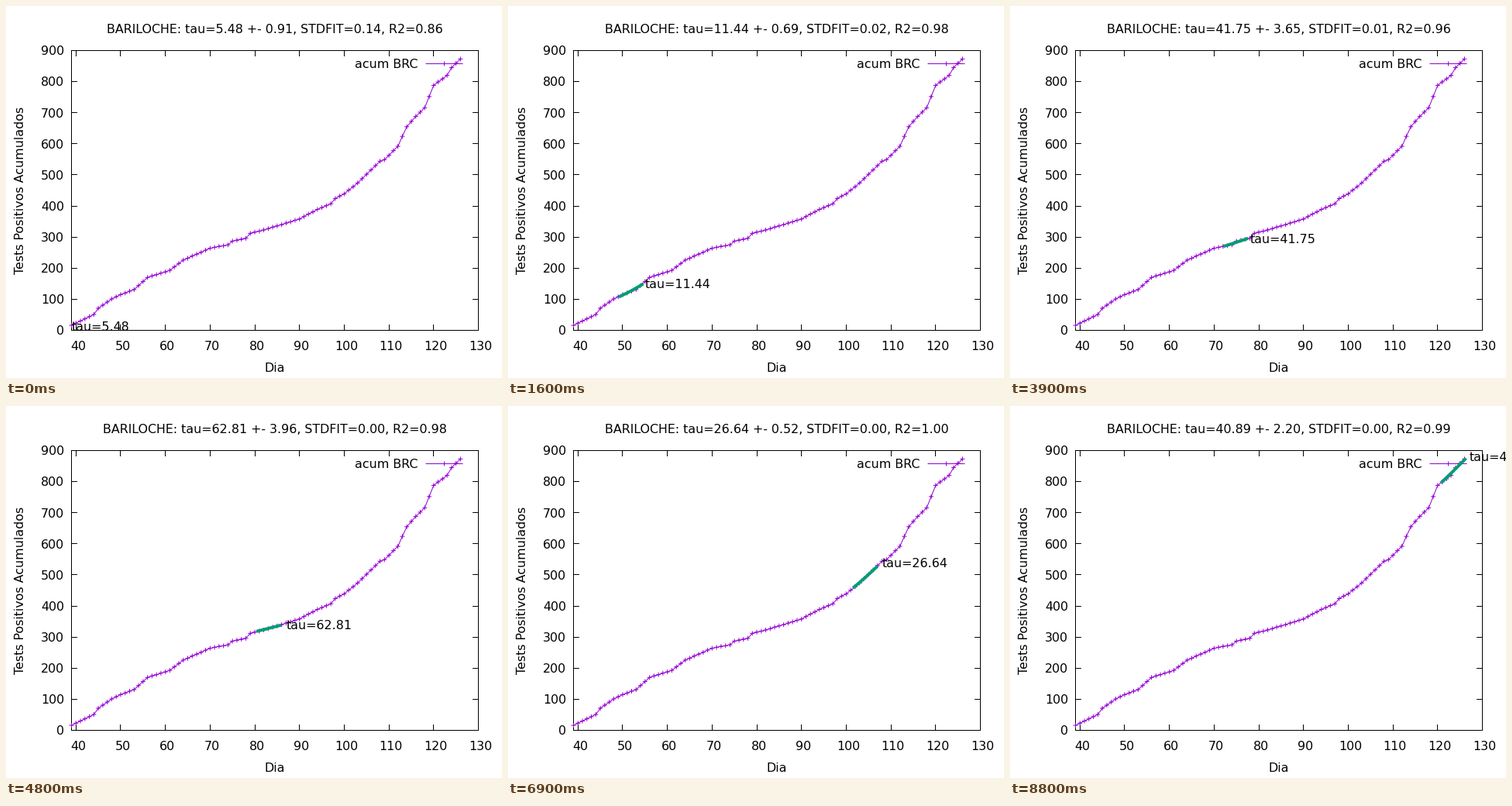
Recreate the animation shown at these times as a matplotlib script. Size 640 by 480 pixels, loop 8900 ms.

```python
import numpy as np
import matplotlib.pyplot as plt
from matplotlib.animation import FuncAnimation

W, H, DPI = 640, 480, 100
PT = 72 / DPI                      # points per pixel
FRAMES, STEP = 89, 100
DAY0, DAY1, TOP = 39, 130, 900
LEFT, RIGHT, UPPER, LOWER = 84.5, 609.5, 57.5, 418.5
TICK, ARM = 7.5, 3
PURPLE, GREEN = "#9400d3", "#009e73"

# cumulative positives: (day, count) where the pace changes
BENDS = [(32, 6), (39, 16), (44, 51), (45, 71), (48, 101), (50, 115),
         (53, 131), (56, 170), (61, 193), (64, 226), (70, 264), (74, 275),
         (75, 287), (78, 296), (79, 312), (82, 323), (90, 358), (94, 389),
         (97, 407), (98, 424), (100, 439), (103, 474), (108, 544),
         (109, 549), (112, 592), (114, 655), (116, 688), (118, 716),
         (120, 788), (123, 820), (124, 845), (126, 873)]
# doubling time and its error: (day, tau, error)
TAUS = [(39, 5.48, 0.91), (46, 3.13, 0.15), (55, 11.44, 0.69),
        (64, 18.97, 1.36), (78, 41.75, 3.65), (87, 62.81, 3.96),
        (96, 36.32, 1.51), (108, 26.64, 0.52), (117, 20.0, 0.84),
        (127, 40.89, 2.20)]

DAYS = np.arange(32, 127)
CASES = np.round(np.interp(DAYS, *zip(*BENDS)))
GRID = np.linspace(DAY0, DAY1, 100)

plt.rcParams["font.family"] = "DejaVu Sans"
plt.rcParams["font.size"] = 15.9 * PT


def px(day):
    return LEFT + (day - DAY0) * (RIGHT - LEFT) / (DAY1 - DAY0)


def py(count):
    return LOWER - count * (LOWER - UPPER) / TOP


def fit(day):
    """Exponential trend and its statistics for the eight days up to day."""
    use = (DAYS >= day - 7) & (DAYS <= day)
    mid, level = DAYS[use].mean(), np.log(CASES[use]).mean()
    spread = ((DAYS[use] - mid) ** 2).sum()
    when, taus, errs = zip(*TAUS)
    tau = np.exp(np.interp(day, when, np.log(taus)))
    err = np.exp(np.interp(day, when, np.log(errs)))
    slope, rel = np.log(2) / tau, err / tau
    dev = slope * rel * np.sqrt(spread)
    r2 = 1 / (1 + (use.sum() - 2) * rel ** 2)
    return lambda d: np.exp(level + slope * (d - mid)), (tau, err, dev, r2)


fig = plt.figure(figsize=(W / DPI, H / DPI), dpi=DPI, facecolor="white")
ax = fig.add_axes([0, 0, 1, 1])
ax.set_xlim(0, W)
ax.set_ylim(H, 0)
ax.axis("off")


def line(xs, ys, color="black", width=1.0, **kw):
    return ax.plot(xs, ys, color=color, lw=width * PT, snap=False,
                   solid_capstyle="butt", **kw)[0]


def text(x, y, s="", ha="center", **kw):
    return ax.text(x, y, s, ha=ha, va="baseline", color="black", **kw)


def crosses(xs, ys):
    for x, y in zip(xs, ys):
        line([x - ARM, x + ARM, np.nan, x, x],
             [y, y, np.nan, y - ARM, y + ARM], PURPLE)


line([LEFT, RIGHT, RIGHT, LEFT, LEFT], [UPPER, UPPER, LOWER, LOWER, UPPER],
     solid_joinstyle="miter")
for d in range(40, DAY1 + 1, 10):
    x = np.floor(px(d)) + 0.5
    line([x, x], [LOWER, LOWER - TICK])
    line([x, x], [UPPER, UPPER + TICK])
    text(px(d) + 2.5, 444, str(d))
for c in range(0, TOP + 1, 100):
    y = np.floor(py(c)) + 0.5
    line([LEFT, LEFT + TICK], [y, y])
    line([RIGHT, RIGHT - TICK], [y, y])
    text(75, py(c) + 5.8, str(c), ha="right")

text(347, 472, "Dia")
text(22.6, 237.8, "Tests Positivos Acumulados", rotation=90,
     rotation_mode="anchor")
text(531.8, 80, "acum BRC", ha="right")

line([541.5, 589.5], [74.5, 74.5], PURPLE)
crosses([565.5], [74.5])
xs, ys = px(DAYS[DAYS >= DAY0]), py(CASES[DAYS >= DAY0])
line(xs, ys, PURPLE)
crosses(xs, ys)

trend = line([], [], GREEN, 4, solid_joinstyle="round")
title = text(346.8, 35)
label = text(0, 0, ha="left")


def draw(i):
    day = DAY0 + i
    curve, stats = fit(day)
    part = GRID[(GRID >= day - 6.7) & (GRID <= day - 0.3)]
    trend.set_data(px(part), py(curve(part)))
    title.set_text("BARILOCHE: tau=%.2f +- %.2f, STDFIT=%.2f, R2=%.2f" % stats)
    label.set_text("tau=%.2f" % stats[0])
    label.set_position((px(day), py(curve(day)) + 7.1))
    return trend, title, label


anim = FuncAnimation(fig, draw, frames=FRAMES, interval=STEP,
                     init_func=lambda: draw(0), repeat=True, repeat_delay=0)
plt.show()
```
